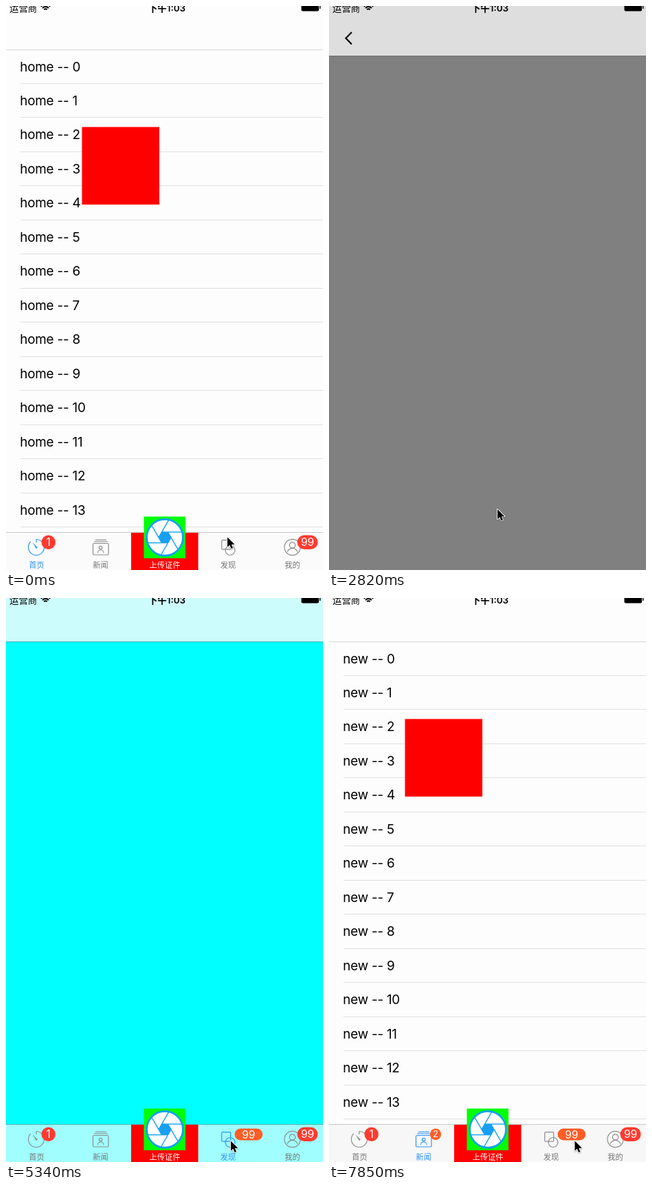
These frames come from a looping animation (461x818 px, 8000 ms). An HTML page with a canvas:

```html
<!DOCTYPE html>
<html lang="zh">
<head>
<meta charset="utf-8">
<title>Tab bar demo</title>
<style>
html, body { margin: 0; width: 100%; height: 100%; overflow: hidden; background: #fff; }
canvas { display: block; width: 461px; height: 818px; }
</style>
</head>
<body>
<canvas id="stage"></canvas>
<script>
const W = 461, H = 818, LOOP = 8000, STEPS = 54, STEP = LOOP / STEPS;
const NAV = 63, BAR = 763, ROW = 49.48, SHEET_NAV = 72;
const GRAY = '#8c8c8c', BLUE = '#2f93f8', RED = '#ff3b30', ORANGE = '#ff5c26';
const LATIN = 'Inter, "Noto Sans CJK SC", sans-serif';
const HAN = '"Noto Sans CJK SC", "Noto Sans CJK", sans-serif';

const canvas = document.getElementById('stage');
const ctx = canvas.getContext('2d');
const dpr = window.devicePixelRatio || 1;
canvas.width = W * dpr;
canvas.height = H * dpr;

// Pointer path: [step, x, y]
const PATH = [
  [0, 322, 770.5], [4, 266, 748], [9, 266, 748], [16, 246, 746],
  [17, 246, 746], [19, 245, 730], [25, 29, 37.5], [28, 29, 37.5],
  [33, 327, 787.5], [37, 327, 787.5], [42, 137, 785], [48, 137, 785],
  [53, 357.5, 787.5]
];

const clamp = v => Math.max(0, Math.min(1, v));
const ease = v => { v = clamp(v); return v * v * (3 - 2 * v); };

function box(x, y, w, h, color) {
  ctx.fillStyle = color;
  ctx.fillRect(x, y, w, h);
}

function text(str, x, y, font, color, align = 'left', spacing = 0) {
  ctx.font = font;
  ctx.fillStyle = color;
  ctx.textAlign = align;
  ctx.letterSpacing = spacing + 'px';
  ctx.fillText(str, x, y);
}

function line(points, color, width) {
  ctx.beginPath();
  points.forEach(([x, y]) => ctx.lineTo(x, y));
  ctx.strokeStyle = color;
  ctx.lineWidth = width;
  ctx.stroke();
}

function arc(x, y, r, color, width, from = 0, to = Math.PI * 2) {
  ctx.beginPath();
  ctx.arc(x, y, r, from, to);
  ctx.strokeStyle = color;
  ctx.lineWidth = width;
  ctx.stroke();
}

function outline(x, y, w, h, r, color) {
  ctx.beginPath();
  ctx.roundRect(x, y, w, h, r);
  ctx.strokeStyle = color;
  ctx.lineWidth = 1.2;
  ctx.stroke();
}

function badge(str, x, y, w, h, size, color) {
  ctx.beginPath();
  ctx.roundRect(x, y, w, h, h / 2);
  ctx.fillStyle = color;
  ctx.fill();
  text(str, x + w / 2, y + h / 2 + size * 0.36, `${size}px ${LATIN}`, '#fff', 'center');
}

function statusBar() {
  text('运营商', 5, 8, `13.4px ${HAN}`, '#000');
  for (const r of [3.2, 6.4, 9.6]) arc(57.5, 7.5, r, '#000', 2, -Math.PI * 0.75, -Math.PI * 0.25);
  text('下午1:03', 234, 7.5, `600 13.4px ${LATIN}`, '#000', 'center');
  ctx.beginPath();
  ctx.roundRect(429.5, -4, 25.5, 11.5, 2);
  ctx.fillStyle = '#000';
  ctx.fill();
  box(456, 0, 1.4, 4, '#000');
}

function list(name, selected) {
  box(0, 0, W, H, '#fdfdfd');
  for (let i = 0; i < 15; i++) {
    const top = NAV + 0.5 + ROW * i;
    if (i === selected) box(0, Math.round(top) - 1, W, 50, '#d9d9d9');
    text(`${name} -- ${i}`, 20.3, top + 31, `18.9px ${LATIN}`, '#000', 'left', -0.24);
    box(21, Math.round(top + ROW) - 1, W - 21, 1, '#e0e0e0');
  }
  box(0, NAV, W, 1, '#d6d6d6');
  box(110.5, 175.5, 112.5, 112.5, '#f00');
}

function cyanPage() {
  box(0, 0, W, H, '#0ff');
  box(0, 0, W, NAV, '#cdfcfc');
  box(0, NAV, W, 1, '#3fb8b8');
}

function homeIcon(c) {
  arc(44, 785, 11.5, c, 1.2, -Math.PI / 2, Math.PI * 1.25);
  line([[44, 773.5], [44, 778]], c, 1.2);
  ctx.beginPath();
  [[38.5, 778], [46, 785.5], [44, 787.2]].forEach(([x, y]) => ctx.lineTo(x, y));
  ctx.fillStyle = c;
  ctx.fill();
}

function newsIcon(c) {
  line([[130, 774.3], [146, 774.3]], c, 1.1);
  line([[128, 776.9], [148, 776.9]], c, 1.1);
  outline(126.5, 779.5, 22.5, 16.5, 1.5, c);
  arc(137.7, 785.6, 2.3, c, 1.1);
  arc(137.7, 793.3, 4.3, c, 1.1, -Math.PI, 0);
}

function findIcon(c) {
  outline(313.7, 774.7, 13, 13.5, 1.5, c);
  arc(326, 789.5, 7, c, 1.2);
}

function mineIcon(c) {
  arc(416.5, 785, 11.6, c, 1.2);
  arc(416.5, 782, 4.2, c, 1.2);
  arc(416.5, 794.5, 8, c, 1.2, -Math.PI * 0.88, -Math.PI * 0.12);
}

function shutter() {
  const cx = 231, cy = 770.8, r = 26.4, hub = 9, blue = '#16a0f2';
  box(182, 764, 97.5, 54, '#f00');
  box(200.5, 740.5, 60.5, 60.5, '#0f0');
  ctx.beginPath();
  ctx.arc(cx, cy, r, 0, Math.PI * 2);
  ctx.fillStyle = '#fff';
  ctx.fill();
  const corner = i => [cx + hub * Math.cos(i * Math.PI / 3), cy + hub * Math.sin(i * Math.PI / 3)];
  ctx.beginPath();
  for (let i = 0; i < 6; i++) ctx.lineTo(...corner(i));
  ctx.fillStyle = blue;
  ctx.fill();
  // Each hub edge runs on as a blade edge up to the ring.
  for (let i = 0; i < 6; i++) {
    const [ax, ay] = corner(i), [bx, by] = corner(i + 1);
    line([[ax, ay], [bx + (bx - ax) * 2.2, by + (by - ay) * 2.2]], blue, 1.4);
  }
  arc(cx, cy, r, blue, 2.8);
  text('上传证件', cx, 814.5, `11.3px ${HAN}`, '#fff', 'center');
}

function tabBar(active, fill, edge, showNews, showFind) {
  box(0, BAR, W, H - BAR, fill);
  box(0, BAR, W, 1, edge);
  const tabs = [[homeIcon, '首页', 44.5], [newsIcon, '新闻', 137.5],
                [findIcon, '发现', 323], [mineIcon, '我的', 416.5]];
  tabs.forEach(([icon, label, x], i) => {
    icon(i === active ? BLUE : GRAY);
    text(label, x, 815, `11.2px ${HAN}`, i === active ? BLUE : '#767676', 'center');
  });
  shutter();
  badge('1', 51.5, 767.5, 20.5, 20.5, 15.5, RED);
  badge('99', 423.5, 767.5, 30, 20.5, 15.5, RED);
  if (showFind) badge('99', 332.5, 769.5, 40.7, 17, 15.5, ORANGE);
  if (showNews) badge('2', 147, 769.5, 16, 16.5, 13, ORANGE);
}

function sheet(top, navColor, pressed) {
  box(0, top, W, H, '#808080');
  box(0, top, W, SHEET_NAV, navColor);
  box(0, top + SHEET_NAV, W, 1, '#707070');
  ctx.globalAlpha = pressed ? 0.25 : 1;
  line([[33, top + 38], [24.5, top + 46.7], [33, top + 55.4]], '#000', 2.2);
  ctx.globalAlpha = 1;
}

function pointer(k) {
  let i = 0;
  while (i < PATH.length - 2 && PATH[i + 1][0] <= k) i++;
  const [k0, x0, y0] = PATH[i], [k1, x1, y1] = PATH[i + 1];
  const p = ease((k - k0) / (k1 - k0));
  ctx.save();
  ctx.translate(x0 + (x1 - x0) * p, y0 + (y1 - y0) * p);
  ctx.beginPath();
  [[0, 0], [0, 14.3], [3.3, 11.3], [5.6, 16.5], [8, 15.5], [5.8, 10.4], [10.4, 10.2]]
    .forEach(([x, y]) => ctx.lineTo(x, y));
  ctx.closePath();
  ctx.shadowColor = 'rgba(0,0,0,.3)';
  ctx.shadowBlur = 2 * dpr;
  ctx.shadowOffsetY = dpr;
  ctx.lineJoin = 'round';
  ctx.strokeStyle = '#fff';
  ctx.lineWidth = 1.8;
  ctx.stroke();
  ctx.shadowColor = 'transparent';
  ctx.fillStyle = '#000';
  ctx.fill();
  ctx.restore();
}

function draw(k) {
  const t = k * STEP;
  ctx.setTransform(dpr, 0, 0, dpr, 0, 0);
  if (k < 36) {
    list('home', k >= 8 && k < 28 ? 13 : -1);
    tabBar(0, '#fbfbfb', '#c8c8c8', false, false);
    const shown = ease((t - 2414) / 300) - ease((t - 4002.7) / 300);
    if (shown > 0) {
      sheet(Math.round(H * (1 - shown)), k < 18 ? '#e9e9e9' : '#dedede', k === 26 || k === 27);
    }
  } else if (k < 44) {
    cyanPage();
    tabBar(2, '#a0fefe', '#4fb4b4', false, true);
  } else {
    list('new', -1);
    tabBar(1, '#f7f7f7', '#c8c8c8', true, true);
  }
  statusBar();
  pointer(k);
}

const start = performance.now();
function tick() {
  const t = (performance.now() - start) % LOOP;
  // The screen refreshes at a fixed, low rate.
  draw(Math.min(STEPS - 1, Math.floor((t + 6) / STEP)));
  requestAnimationFrame(tick);
}
tick();
</script>
</body>
</html>
```
